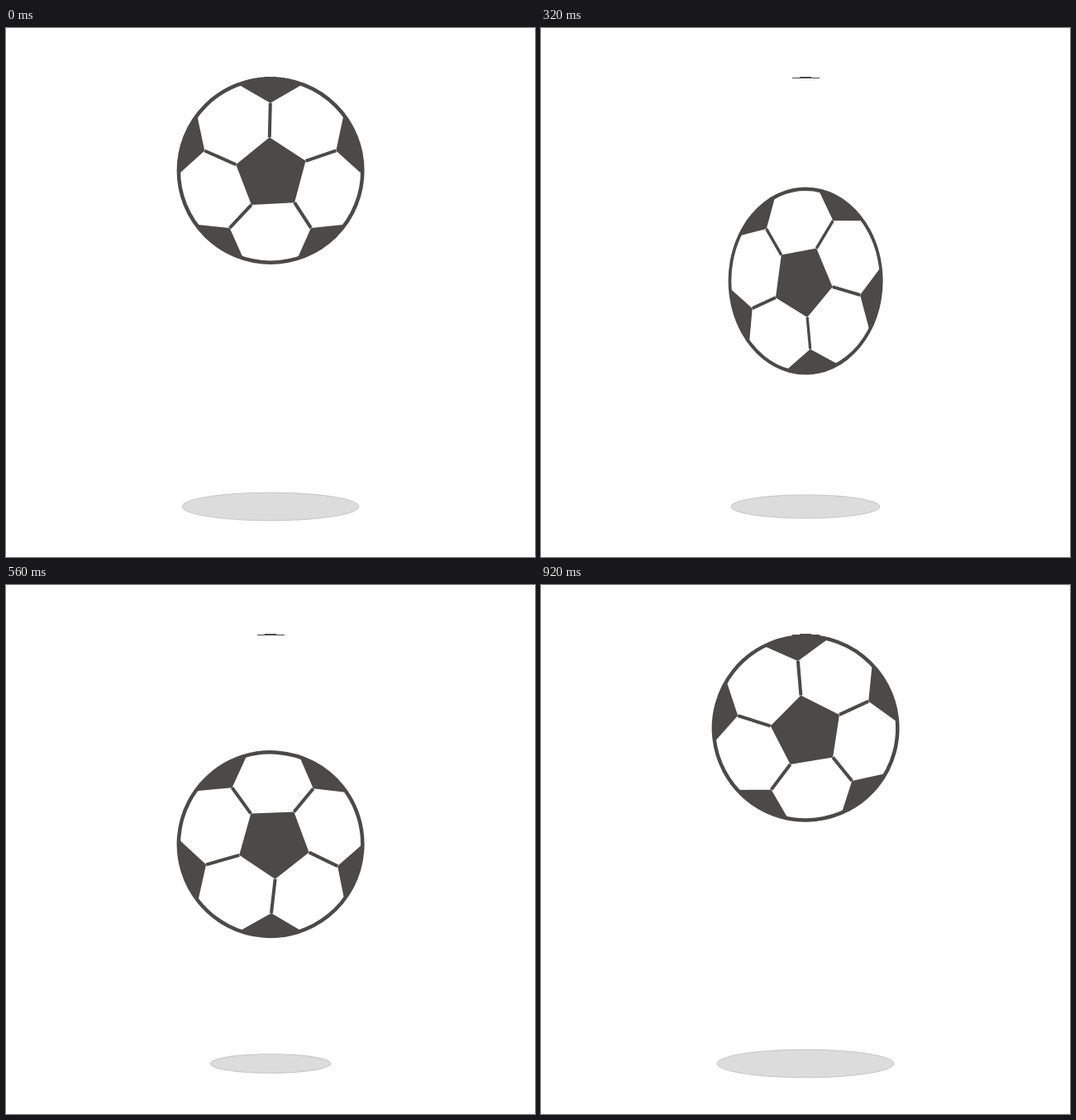
Write an HTML page that moves like this. It is 640 px wide and 640 px high and loops after 960 ms.

```html
<!DOCTYPE html>
<html lang="en">
<head>
<meta charset="utf-8">
<title>Bouncing ball</title>
<style>
  html, body { margin: 0; width: 100%; height: 100%; overflow: hidden; background: #fff; }
  svg { display: block; width: 100%; height: 100%; }
</style>
</head>
<body>
<svg viewBox="0 0 640 640">
  <clipPath id="rim"><circle r="111"/></clipPath>
  <ellipse id="shadow" cx="320" cy="579" fill="#dcdcdc" stroke="#555" stroke-opacity=".4" stroke-width=".6"/>
  <path d="M304 60h33v1h-33zM313 59h14v1h-14z" fill="#4b4a48"/>
  <g id="ball" stroke="#4b4a48">
    <circle r="111.25" fill="#fff" stroke-width="4.5"/>
    <g clip-path="url(#rim)">
      <path id="patches" fill="#4b4a48" stroke="none"/>
      <path id="seams" stroke-width="4"/>
    </g>
  </g>
</svg>
<script>
const LOOP = 960, STEP = 40, LAND = 440, LEAVE = 480;
const $ = id => document.getElementById(id);

// Point at a distance and an angle in degrees from a centre.
function polar(cx, cy, r, deg) {
  const a = deg * Math.PI / 180;
  return [cx + r * Math.cos(a), cy + r * Math.sin(a)];
}

// A pentagon in the middle, a seam from each corner, a 120° wedge at each seam's end.
function drawPanels() {
  const corners = [];
  let patches = '', seams = '';
  for (let k = 0; k < 5; k++) {
    const a = -90 + 72 * k;
    const corner = polar(1, 4.2, 44.4, a - 3);
    const tip = polar(-0.3, 1.8, 83.6, a);
    corners.push(corner);
    seams += `M${corner}L${tip}`;
    patches += `M${tip}L${polar(...tip, 60, a - 60)}L${polar(...tip, 60, a + 60)}Z`;
  }
  $('patches').setAttribute('d', `M${corners.join('L')}Z${patches}`);
  $('seams').setAttribute('d', seams);
}

// Bezier ease with control points (a, 0) and (c, 0), solved by bisection.
function ease(x, a, c) {
  let lo = 0, hi = 1;
  for (let i = 0; i < 30; i++) {
    const s = (lo + hi) / 2, r = 1 - s;
    if (3 * a * s * r * r + 3 * c * s * s * r + s * s * s < x) lo = s; else hi = s;
  }
  return lo ** 3;
}

// 0 at the top of the bounce, 1 on the ground.
function bounce(t, down, up) {
  if (t < LAND) return ease(t / LAND, ...down);
  if (t <= LEAVE) return 1;
  return ease((LOOP - t) / (LOOP - LEAVE), ...up);
}

// Half a turn speeding up to the landing, half a turn slowing down after it.
function spin(t) {
  const half = (u, n) => 180 * (0.45 * u + 0.55 * u ** n);
  return t < LAND ? half(t / LAND, 2.6) : 360 - half((LOOP - t) / (LOOP - LAND), 3);
}

function squeeze(t) {
  const k = t <= LEAVE ? (t - 160) / 240 : (560 - t) / 80;
  return 1 - 0.264 * Math.min(1, Math.max(0, k));
}

function draw(t) {
  const y = 172.5 + 291.8 * bounce(t, [0.198, 0.601], [0.1355, 0.8426]);
  const rx = 107 - 83 * bounce(t, [0.391, 0.948], [0.333, 0.879]);
  $('ball').setAttribute('transform',
    `translate(320.1 ${y}) scale(${squeeze(t)} 1) rotate(${spin(t)})`);
  $('shadow').setAttribute('rx', rx);
  $('shadow').setAttribute('ry', rx * 0.159);
}

drawPanels();
const start = performance.now();
function tick() {
  const t = (performance.now() - start) % LOOP;
  draw(Math.floor(t / STEP) * STEP);
  requestAnimationFrame(tick);
}
tick();
</script>
</body>
</html>
```
